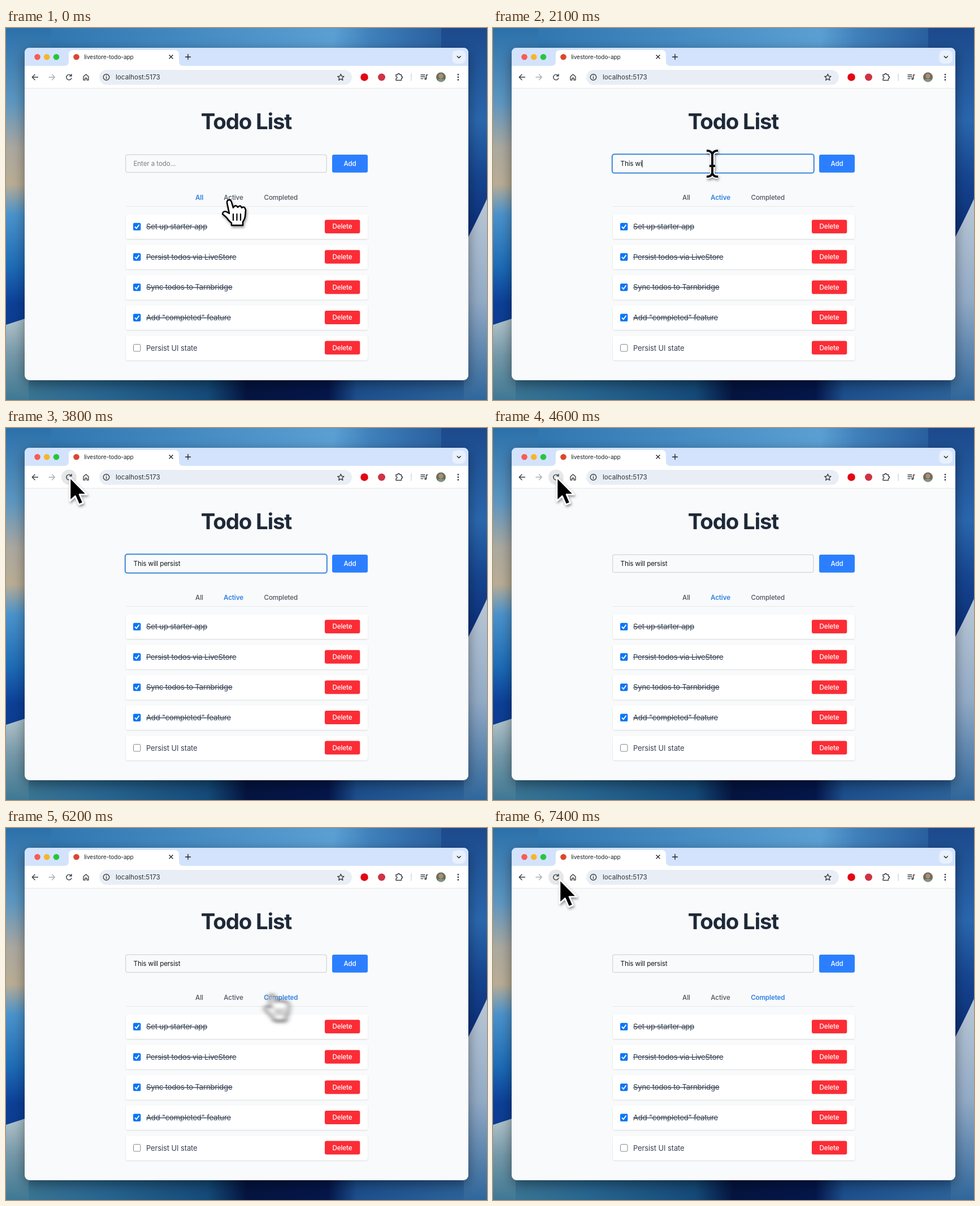
Recreate the animation shown at these times as an HTML page. Size 851 by 658 pixels, loop 7500 ms.

```html
<!DOCTYPE html>
<html lang="en">
<head>
<meta charset="utf-8">
<title>Todo List</title>
<style>
html, body { margin: 0; width: 100%; height: 100%; overflow: hidden; background: #245f96; }
svg { display: block; width: 851px; height: 658px; font-family: Inter, "Liberation Sans", sans-serif; }
.small { font-size: 11.6px; letter-spacing: -.1px; }
.mid { text-anchor: middle; }
.tab { font-weight: 500; fill: #4b5563; }
.tab.on { font-weight: 600; fill: #2f80e8; }
.button { font-weight: 500; fill: #fff; }
.item { font-size: 13px; letter-spacing: -.12px; fill: #364153; }
.line { fill: none; stroke: #3c4043; stroke-width: 1.4; stroke-linecap: round; stroke-linejoin: round; }
</style>
</head>
<body>
<svg viewBox="0 0 851 658">
  <defs>
    <linearGradient id="top">
      <stop stop-color="#2b70aa"/><stop offset=".35" stop-color="#4288bf"/><stop offset=".68" stop-color="#5b9fd2"/>
      <stop offset=".76" stop-color="#3f7fba"/><stop offset="1" stop-color="#1c4a8c"/>
    </linearGradient>
    <linearGradient id="left" x2="0" y2="1">
      <stop stop-color="#2b70aa"/><stop offset=".2" stop-color="#5d96c0"/><stop offset=".32" stop-color="#aaa89f"/>
      <stop offset=".42" stop-color="#b9ac94"/><stop offset=".5" stop-color="#4b93cb"/><stop offset=".64" stop-color="#1d6cb7"/>
      <stop offset=".74" stop-color="#0c3f98"/><stop offset="1" stop-color="#0a3478"/>
    </linearGradient>
    <linearGradient id="right" x2="0" y2="1">
      <stop stop-color="#1c4a8c"/><stop offset=".25" stop-color="#2a66ad"/><stop offset=".4" stop-color="#16458f"/>
      <stop offset=".55" stop-color="#0b2f7a"/><stop offset="1" stop-color="#123e80"/>
    </linearGradient>
    <linearGradient id="bottom">
      <stop stop-color="#3f7894"/><stop offset=".2" stop-color="#28658f"/><stop offset=".42" stop-color="#154a78"/>
      <stop offset=".5" stop-color="#04143f"/><stop offset=".67" stop-color="#04164a"/>
      <stop offset=".73" stop-color="#1d4f8d"/><stop offset="1" stop-color="#2f669b"/>
    </linearGradient>
    <linearGradient id="leftSweep" x2="0" y2="1">
      <stop stop-color="#b3c5cd"/><stop offset=".45" stop-color="#7699a9"/><stop offset="1" stop-color="#3f7894"/>
    </linearGradient>
    <linearGradient id="rightSweep" x2="0" y2="1">
      <stop stop-color="#b9c7d6"/><stop offset=".5" stop-color="#93abc6"/><stop offset="1" stop-color="#2f669b"/>
    </linearGradient>
    <filter id="windowShadow" x="-10%" y="-10%" width="120%" height="120%">
      <feDropShadow dx="0" dy="7" stdDeviation="11" flood-opacity=".42"/>
    </filter>
    <filter id="cardShadow" x="-5%" y="-20%" width="110%" height="150%">
      <feDropShadow dx="0" dy="1" stdDeviation="1.2" flood-opacity=".14"/>
    </filter>
    <filter id="motion" filterUnits="userSpaceOnUse" x="-60" y="-60" width="150" height="150">
      <feGaussianBlur id="blur" stdDeviation="0"/>
      <feDropShadow dx="1.5" dy="3" stdDeviation="2" flood-opacity=".4"/>
    </filter>
    <clipPath id="face"><circle cx="769.5" cy="87" r="8.5"/></clipPath>
  </defs>

  <!-- wallpaper -->
  <rect width="851" height="60" fill="url(#top)"/>
  <rect width="80" height="658" fill="url(#left)"/>
  <rect x="770" width="81" height="658" fill="url(#right)"/>
  <rect y="610" width="851" height="48" fill="url(#bottom)"/>
  <path d="M0 525L40 512V658H0Z" fill="url(#leftSweep)"/>
  <path d="M851 302Q836 335 810 385V658H851Z" fill="url(#rightSweep)"/>

  <!-- browser -->
  <rect x="33" y="35" width="785" height="588" rx="9" fill="#f9fafb" filter="url(#windowShadow)"/>
  <path d="M33 68V44Q33 35 42 35H809Q818 35 818 44V68Z" fill="#d3e3fd"/>
  <path d="M33 67H103Q111 67 111 59V47Q111 39 119 39H298Q306 39 306 47V59Q306 67 314 67H818V106H33Z" fill="#fff"/>
  <path d="M33 106.5H818" stroke="#e4e7eb"/>
  <circle cx="55.5" cy="51.3" r="5.3" fill="#f95b54"/>
  <circle cx="72.2" cy="51.3" r="5.3" fill="#f7b52c"/>
  <circle cx="89" cy="51.3" r="5.3" fill="#28c53f"/>
  <circle cx="124.5" cy="51.2" r="5.3" fill="#d9492f"/>
  <text x="138" y="54.8" font-size="10.1" letter-spacing="-.08" fill="#1f2328">livestore-todo-app</text>
  <rect x="789.5" y="39.5" width="23.5" height="23.5" rx="8" fill="#e9f1fe"/>
  <rect x="165" y="74" width="447" height="26.5" rx="13.2" fill="#e9eef6"/>
  <circle id="hover" cx="111.5" cy="87" r="13.5" fill="#e6e7e9"/>
  <g class="line">
    <path d="M289 48L295 54M295 48L289 54M322 46.5V55.5M317.5 51.2H326.5M798.3 50L801.3 53L804.3 50" stroke="#22262b"/>
    <path d="M56.5 87H46.5M51 82.3L46.3 87L51 91.7"/>
    <path d="M76 87H86M81.5 82.3L86.2 87L81.5 91.7" stroke="#a9adb2"/>
    <path d="M115.3 84.3A4.7 4.7 0 1 0 116 88.6M116 81.7V85H112.6"/>
    <path d="M137 86L141.5 82L146 86V92H143V88.5H140V92H137Z"/>
    <circle cx="177.5" cy="87" r="5.3"/>
    <path d="M177.5 86.5V89.5M177.5 84.2V84.3"/>
    <path d="M592.3 81.5L594 85.2L598 85.6L595 88.3L595.9 92.3L592.3 90.2L588.7 92.3L589.6 88.3L586.6 85.6L590.6 85.2Z"/>
    <path d="M690 82.5H693.2Q693.2 80.5 694.8 80.5T696.4 82.5H699.5V85.7Q701.6 85.7 701.6 87.3T699.5 89V92.5H690V89.5Q692 89 692 87.4T690 85.7Z"/>
    <path d="M717 81V93" stroke="#c9d8ee"/>
    <path d="M734 83H741M734 86.3H741M734 89.6H738M743.7 89.5V83H746"/>
    <circle cx="742.2" cy="89.7" r="1.3"/>
  </g>
  <text x="194" y="91" font-size="11.7" fill="#30343a">localhost:5173</text>
  <circle cx="634" cy="87" r="6.8" fill="#e30613"/>
  <circle cx="664.5" cy="87" r="6.5" fill="#cf3346"/>
  <g clip-path="url(#face)">
    <rect x="760" y="78" width="20" height="18" fill="#66705c"/>
    <circle cx="769.5" cy="85" r="4.2" fill="#b48b72"/>
    <ellipse cx="769.5" cy="95" rx="7" ry="5.5" fill="#80947f"/>
  </g>
  <g fill="#3c4043"><circle cx="800" cy="82.3" r="1.4"/><circle cx="800" cy="87" r="1.4"/><circle cx="800" cy="91.7" r="1.4"/></g>

  <!-- page -->
  <text class="mid" x="425" y="179" font-size="38.5" font-weight="700" letter-spacing="-1.2" fill="#1e2939">Todo List</text>
  <rect id="field" fill="#f9fafb"/>
  <text id="entry" class="small" x="225.5" y="244.2"></text>
  <rect id="caret" y="233.5" width="1" height="13" fill="#111"/>
  <rect x="577" y="224" width="63" height="31.7" rx="3.3" fill="#2b7fff"/>
  <text class="small mid button" x="608.5" y="244.2">Add</text>
  <g id="tabs" class="small mid">
    <text x="342" y="303.5">All</text>
    <text x="402.5" y="303.5">Active</text>
    <text x="486.3" y="303.5">Completed</text>
  </g>
  <path d="M212 315.7H640" stroke="#e5e7eb"/>
  <g id="list"></g>

  <g id="cursor" filter="url(#motion)">
    <path id="arrow" d="M0 0V42L9.5 33.5L16 48.5L23.5 45.3L17 30.5H30Z" fill="#000" stroke="#fff" stroke-width="2.6" stroke-linejoin="round"/>
    <g id="hand" stroke="#000" stroke-width="2.5" stroke-linejoin="round" stroke-linecap="round">
      <path d="M-6 5Q-6 0 -2 0Q1 0 2 4L5 14Q9 7 13 13Q18 8 20 14Q25 10 27 18L26 30Q25 35 22 39V45H2V41Q-4 36 -7 31L-14 25Q-13 19 -7 21L-2 24Z" fill="#fff"/>
      <path d="M5 25V36M11.5 25V36M18 25V36" stroke-width="2.2"/>
    </g>
    <g id="beam" fill="none">
      <path id="stem" d="M-10 -23Q-1 -23 0 -16Q1 -23 10 -23M0 -17V17M-10 23Q-1 23 0 16Q1 23 10 23M-5 4H5" stroke="#fff" stroke-width="7.5"/>
      <use href="#stem" style="display:none"/>
      <path d="M-10 -23Q-1 -23 0 -16Q1 -23 10 -23M0 -17V17M-10 23Q-1 23 0 16Q1 23 10 23M-5 4H5" stroke="#111" stroke-width="4"/>
    </g>
  </g>
</svg>
<script>
const $ = id => document.getElementById(id);
const set = (el, attrs) => { for (const k in attrs) el.setAttribute(k, attrs[k]); };
const show = (el, on) => { el.style.display = on ? '' : 'none'; };

const LOOP = 7500, STEP = 100, MESSAGE = 'This will persist';
const TYPE_START = 1700, TYPE_END = 2750, FOCUS = 1500, RELOAD = 4000;
const presses = [400, 1500, 4000, 6000, 6800];

// time, x, y of the pointer tip
const path = [
  [0, 397, 304], [700, 397, 304], [1100, 394, 259], [1400, 388, 240], [2700, 388, 240],
  [3100, 308, 146], [3700, 113, 87], [5000, 113, 87], [5600, 430, 302], [5850, 488, 304],
  [6150, 488, 304], [6550, 118, 91], [7500, 118, 91]
];

$('list').innerHTML = ['Set up starter app', 'Persist todos via LiveStore', 'Sync todos to Tarnbridge',
  'Add "completed" feature', 'Persist UI state'].map((label, i) => {
  const done = i < 4;
  const box = done
    ? '<rect x="225" y="14.7" width="13.4" height="13.4" rx="2.2" fill="#0b76f5"/><path d="M228 21.5L230.8 24.5L235.5 18" fill="none" stroke="#fff" stroke-width="1.9"/>'
    : '<rect x="225.5" y="15.2" width="12.4" height="12.4" rx="2" fill="#fff" stroke="#85888c"/>';
  return `<g transform="translate(0 ${330 + i * 53.6})">
    <rect x="212" width="428" height="43" rx="3.3" fill="#fff" filter="url(#cardShadow)"/>${box}
    <text class="item" x="248" y="26.2" ${done ? 'text-decoration="line-through"' : ''}>${label}</text>
    <rect x="564" y="9.2" width="62.3" height="24" rx="3" fill="#fb2c36"/>
    <text class="small mid button" x="595" y="25.4">Delete</text></g>`;
}).join('');

// Monotone cubic interpolation along one coordinate
function track(t, axis) {
  const slope = i => path[i + 1] && path[i]
    ? (path[i + 1][axis] - path[i][axis]) / (path[i + 1][0] - path[i][0]) : 0;
  const tangent = i => {
    const a = slope(i - 1), b = slope(i);
    return a * b > 0 ? 2 * a * b / (a + b) : 0;
  };
  let i = 0;
  while (i < path.length - 2 && t >= path[i + 1][0]) i++;
  const span = path[i + 1][0] - path[i][0];
  const u = Math.min(1, Math.max(0, (t - path[i][0]) / span)), v = 1 - u;
  return path[i][axis] * (1 + 2 * u) * v * v + path[i + 1][axis] * u * u * (3 - 2 * u)
    + span * u * v * (tangent(i) * v - tangent(i + 1) * u);
}

function drawField(t) {
  const focused = t >= FOCUS && t < RELOAD;
  set($('field'), focused
    ? { x: 210.8, y: 223.3, width: 357, height: 33.3, rx: 4, stroke: '#3c86dc', 'stroke-width': 2 }
    : { x: 211.7, y: 224.2, width: 355.3, height: 31.2, rx: 3.3, stroke: '#d3d6db', 'stroke-width': 1.3 });
  const progress = Math.min(1, Math.max(0, (t - TYPE_START) / (TYPE_END - TYPE_START)));
  const typed = MESSAGE.slice(0, Math.ceil(progress * MESSAGE.length));
  const entry = $('entry');
  entry.textContent = typed || 'Enter a todo...';
  entry.setAttribute('fill', typed ? '#101318' : '#7b7f87');
  const typing = progress > 0 && progress < 1;
  show($('caret'), focused && (typing || Math.floor(t / 500) % 2 === 0));
  $('caret').setAttribute('x', 225.5 + (typed ? entry.getComputedTextLength() : 0));
}

function drawCursor(t) {
  const x = track(t, 1), y = track(t, 2);
  const smear = axis => Math.abs(track(t + 20, axis) - track(t - 20, axis)) / 40 * 7;
  const kind = x > 211 && y > 224 && y < 266 ? 'beam' : x > 320 && y > 285 && y < 315 ? 'hand' : 'arrow';
  for (const name of ['arrow', 'hand', 'beam']) show($(name), name === kind);
  const scale = Math.min(...presses.map(p => 1 - .18 * Math.max(0, 1 - Math.abs(t - p) / 180)));
  $('cursor').setAttribute('transform', `translate(${x} ${y}) scale(${scale})`);
  $('blur').setAttribute('stdDeviation', `${smear(1)} ${smear(2)}`);
  show($('hover'), Math.hypot(x - 111.5, y - 87) < 14);
}

function draw(now) {
  const t = Math.floor(now % LOOP / STEP) * STEP;
  const active = t < 400 ? 0 : t < 6100 ? 1 : 2;
  [...$('tabs').children].forEach((tab, i) => tab.setAttribute('class', i === active ? 'tab on' : 'tab'));
  drawField(t);
  drawCursor(t);
}

const start = performance.now();
function tick() {
  draw(performance.now() - start);
  requestAnimationFrame(tick);
}
tick();
</script>
</body>
</html>
```
